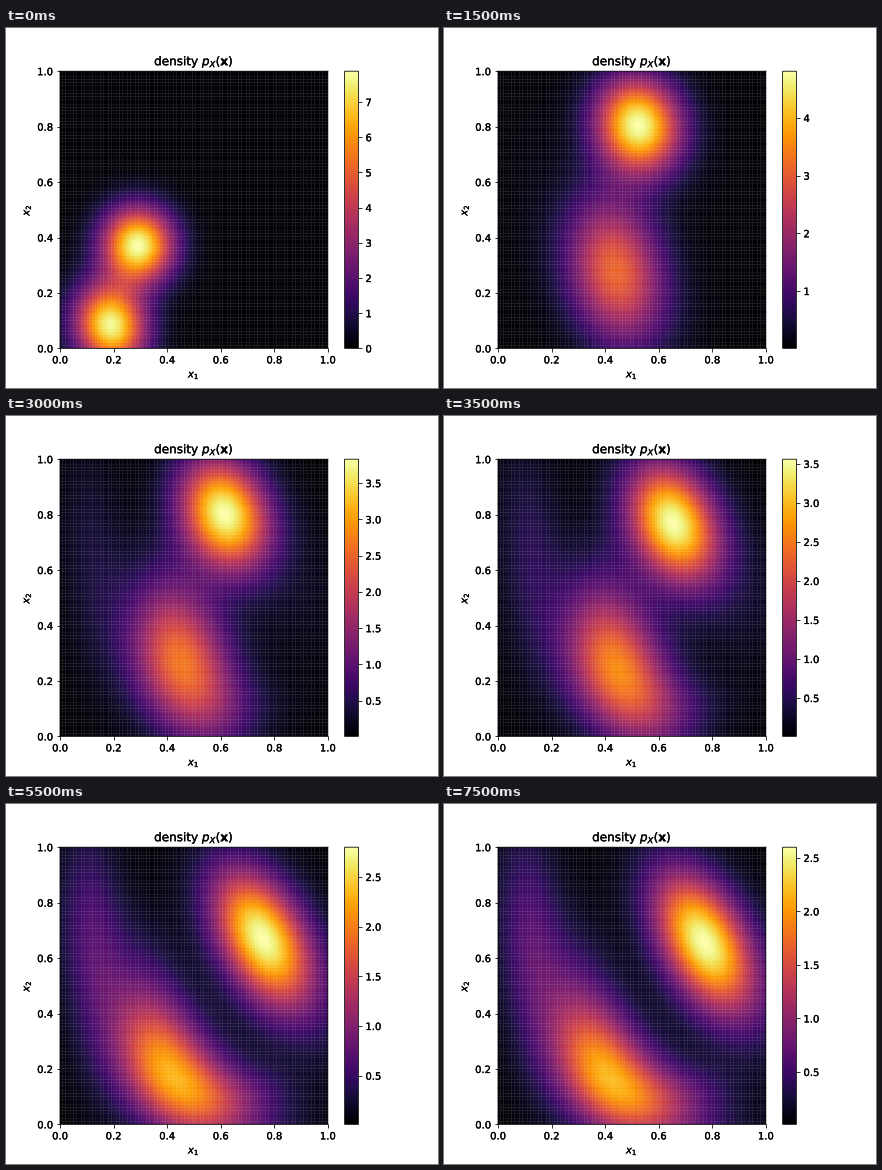
Write a matplotlib script that moves like this. It is 432 by 360 pixels and loops after 8 s.

```python
import numpy as np
import matplotlib.pyplot as plt
from matplotlib.animation import FuncAnimation
from matplotlib.patheffects import withStroke
from matplotlib.text import Text

FRAMES, INTERVAL = 16, 500
INK = [withStroke(linewidth=.3, foreground="k")]


def ease(t, start, mid, end):
    """Quick settling from start to mid, then a slow turn to end."""
    rise = 1 - np.exp(-t / 1.5)
    turn = 1 / (1 + np.exp((7 - t) / 1.5))
    return start + (mid - start) * rise + (end - mid) * turn


def bent(amp, cx, cy, length, width, angle, bend=0):
    """Gaussian whose long axis follows a parabola."""
    c, s = np.cos(np.radians(angle)), np.sin(np.radians(angle))
    along = c * (X - cx) + s * (Y - cy)
    across = c * (Y - cy) - s * (X - cx) - bend * along**2
    return amp * np.exp(-.5 * ((along / length)**2 + (across / width)**2))


def density(t):
    upper = bent(amp=1,
                 cx=ease(t, .285, .54, .76),
                 cy=ease(t, .37, .885, .66),
                 length=ease(t, .096, .122, .19),
                 width=ease(t, .094, .113, .105),
                 angle=ease(t, -75, -70, -61))
    lower = bent(amp=ease(t, .98, .58, .93),
                 cx=ease(t, .185, .48, .41),
                 cy=ease(t, .08, .315, .163),
                 length=ease(t, .105, .2, .23),
                 width=ease(t, .092, .13, .118),
                 angle=ease(t, -70, -80, -50),
                 bend=ease(t, 0, 0, .75))
    # faint tails that only appear with the turn
    tails = ease(t, 0, 0, 1) * (bent(.28, .12, .64, .29, .085, -86)
                                + bent(.12, .70, .12, .14, .07, 0)
                                + bent(.15, .86, .54, .23, .15, -65))
    return upper + lower + tails


def limits(t):
    """Colour range: the peak falls off geometrically between key steps."""
    peak = np.exp(np.interp(t, [0, 3, 5, 7, 9, 11, 15],
                            np.log([7.875, 4.81, 4.12, 3.56, 3.09, 2.8, 2.6])))
    return .01 * (1 - np.exp(-t / 4)), peak


edges = np.linspace(0, 1, 100)
X, Y = np.meshgrid(edges[:-1], edges[:-1])

fig, ax = plt.subplots(figsize=(6, 5), dpi=72)
# unsnapped cells leave faint seams between them
mesh = ax.pcolormesh(edges, edges, density(0), cmap="inferno",
                     antialiased=True, snap=False,
                     edgecolors="face", linewidth=.25)
bar = fig.colorbar(mesh, ax=ax)
bar.outline.set_snap(False)
for spine in ax.spines.values():
    spine.set_snap(False)
ax.set_title(r"density $p_X(\mathbf{x})$")
ax.set_xlabel("$x_1$")
ax.set_ylabel("$x_2$")


def update(n):
    z = density(n)
    low, peak = limits(n)
    mesh.set_array(low + (peak - low) * z / z.max())
    mesh.set_clim(low, peak)
    for label in fig.findobj(Text):
        label.set_path_effects(INK)
    return mesh,


anim = FuncAnimation(fig, update, frames=FRAMES, interval=INTERVAL,
                     repeat=True, repeat_delay=0, blit=False)
plt.show()
```
